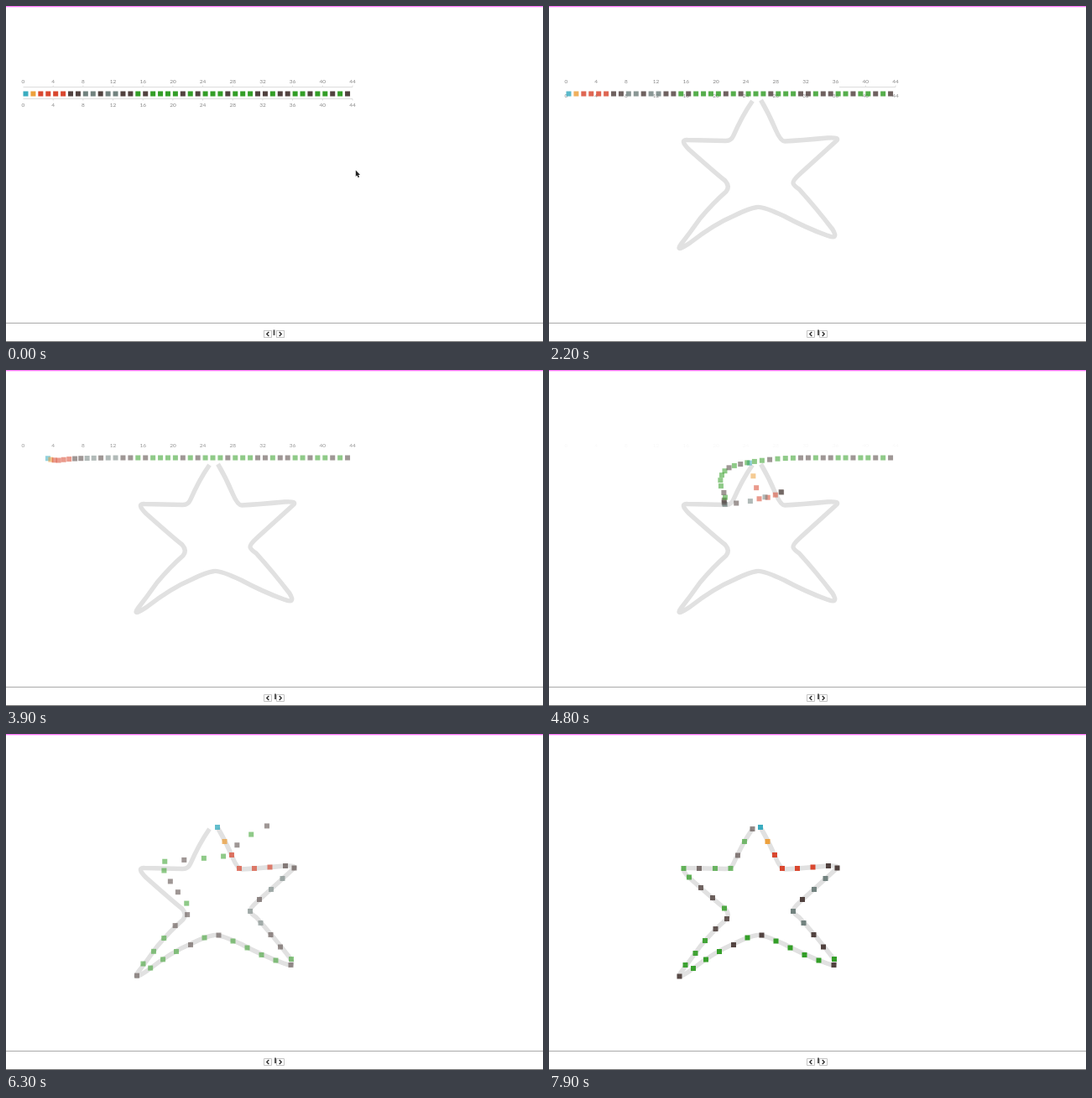
Write an HTML page with a canvas that moves like this. It is 640 by 400 pixels and loops after 8000 ms.

```html
<!DOCTYPE html>
<html>
<head>
<meta charset="utf-8">
<style>
html, body { margin: 0; width: 100%; height: 100%; overflow: hidden; background: #fff; }
canvas { display: block; }
</style>
</head>
<body>
<canvas id="stage" width="640" height="400"></canvas>
<script>
const g = document.getElementById('stage').getContext('2d');
const LOOP = 8000, FADE = 1287, MOVE = 3287, STEP = 2000, DIM = 0.55;

const palette = { t: '#3aacc0', o: '#eda03c', r: '#d9472f', b: '#51423f', s: '#72827f', g: '#339e27' };
const kinds = 'torrrrbbssbssbbgbggggbgbgggbgggbbgbbggbggbgb';
const count = kinds.length;

// Resting place of each square along the star
const goals = [
  252, 111, 260.5, 128, 269, 144, 278, 160, 296, 160, 314.5, 158.5, 333, 157, 343.5, 159.5,
  329.5, 172, 316, 185, 302, 197, 291, 211, 303.5, 225, 315.5, 239, 327, 253.5, 340, 268,
  339.5, 275, 321.5, 269.5, 304.5, 263, 287.5, 254.5, 270.5, 246.5, 253.5, 239.5, 236.5, 242.5,
  220, 251, 203, 259, 187, 268.5, 172, 279, 155.5, 288.5, 162.5, 275, 174.5, 261, 186, 246,
  198.5, 232, 212, 220, 209, 207.5, 195, 195, 181, 183, 167, 170.5, 160.5, 160, 179, 160,
  198, 160, 216.5, 160, 225, 144.5, 233, 128, 242.5, 113
];

const star = new Path2D(`M252.5 112 Q262 128 270 147 Q276 161 281 161 Q300 160 332 157
  Q348 156 342 161 L300 199 Q290 208 291 211 Q292 214 298 218 Q318 240 338 266
  Q346 279 331 273 Q306 264 280 250 Q254 238 248 239.5 Q238 241 222 249 Q196 260 168 282
  Q150 294 157 284 Q168 270 180 253 Q196 234 211 221 Q216 215 210 208 Q202 202 167 171
  Q155 159 165 159.5 Q185 160 210 160.5 Q217 161 220 154 Q230 131 242.5 113`);
const starLength = 790;

const clamp = v => Math.min(1, Math.max(0, v));
const mix = (a, b, p) => a + (b - a) * p;
const ease = v => v < 0.5 ? 4 * v ** 3 : 1 - 4 * (1 - v) ** 3;
const phase = (t, start, span = STEP) => ease(clamp((t - start) / span));

function line(x1, y1, x2, y2, color, width = 1) {
  g.strokeStyle = color;
  g.lineWidth = width;
  g.beginPath();
  g.moveTo(x1, y1);
  g.lineTo(x2, y2);
  g.stroke();
}

function axis(y, dir, erased, fade) {
  g.globalAlpha = 1 - fade;
  g.font = '6.5px Lato, "Open Sans", sans-serif';
  g.textAlign = 'center';
  g.fillStyle = '#858585';
  for (let i = 0; i <= 11; i++) {
    const x = 20.5 + i * 35.68;
    g.fillText(i * 4, x, y + (dir < 0 ? -5 : 9));
    if (erased < i / 11) line(x, y, x, y + dir * 2, '#ddd');
  }
  if (erased < 1) line(mix(20.5, 413, erased), y, 413, y, '#ddd');
  g.globalAlpha = 1;
}

function drawStar(t) {
  const p = clamp((t - 100) / 1800);
  if (!p) return;
  g.lineWidth = 5.4;
  g.strokeStyle = '#e1e1e1';
  g.lineJoin = 'round';
  g.setLineDash(p < 1 ? [starLength * p, 2000] : []);
  g.stroke(star);
  g.setLineDash([]);
}

function squares(t) {
  const dim = mix(1, DIM, phase(t, FADE));
  for (let i = 0; i < count; i++) {
    const start = MOVE + i / count * STEP;
    const p = phase(t, start);
    const x = mix(23.5 + i * 8.92, goals[2 * i], p);
    const y = mix(104.5, goals[2 * i + 1], p);
    g.globalAlpha = mix(dim, 1, phase(t, start + STEP));
    g.fillStyle = palette[kinds[i]];
    g.fillRect(x - 3, y - 3, 6, 6);
  }
  g.globalAlpha = 1;
}

function button(x, dir) {
  g.strokeStyle = '#c4c4c4';
  g.lineWidth = 1;
  g.strokeRect(x - 4.5, 386.5, 9, 8);
  g.strokeStyle = '#222';
  g.lineWidth = 1.2;
  g.beginPath();
  g.moveTo(x - dir * 1.3, 388);
  g.lineTo(x + dir * 1.3, 390.5);
  g.lineTo(x - dir * 1.3, 393);
  g.stroke();
}

function chrome(t) {
  g.fillStyle = '#ff78fa';
  g.fillRect(0, 0, 640, 1.3);
  line(0, 377.5, 640, 377.5, '#aaa');
  line(0, 399.5, 640, 399.5, '#777');
  button(312, -1);
  button(327, 1);
  g.fillStyle = '#555';
  g.fillRect(t < 100 ? 318.5 : 320, 385.5, 2, 6.5);
}

function pointer() {
  g.fillStyle = '#222';
  g.strokeStyle = '#bbb';
  g.lineWidth = 0.6;
  g.fill(new Path2D('M416.8 195.5 V203 L418.5 201.6 L419.6 204.3 L421 203.7 L419.9 201.1 L422 201 Z'));
}

function draw(t) {
  g.fillStyle = '#fff';
  g.fillRect(0, 0, 640, 400);
  drawStar(t);
  const gone = phase(t, MOVE);
  if (gone < 1) {
    axis(96.5, -1, phase(t, 900), gone);
    axis(mix(110.5, 82.5, phase(t, FADE)), 1, phase(t, 100, 1700), phase(t, FADE + 600, 1400));
  }
  squares(t);
  chrome(t);
  if (t < 300) pointer();
}

const begin = performance.now();
function tick() {
  draw((performance.now() - begin) % LOOP);
  requestAnimationFrame(tick);
}
tick();
</script>
</body>
</html>
```
